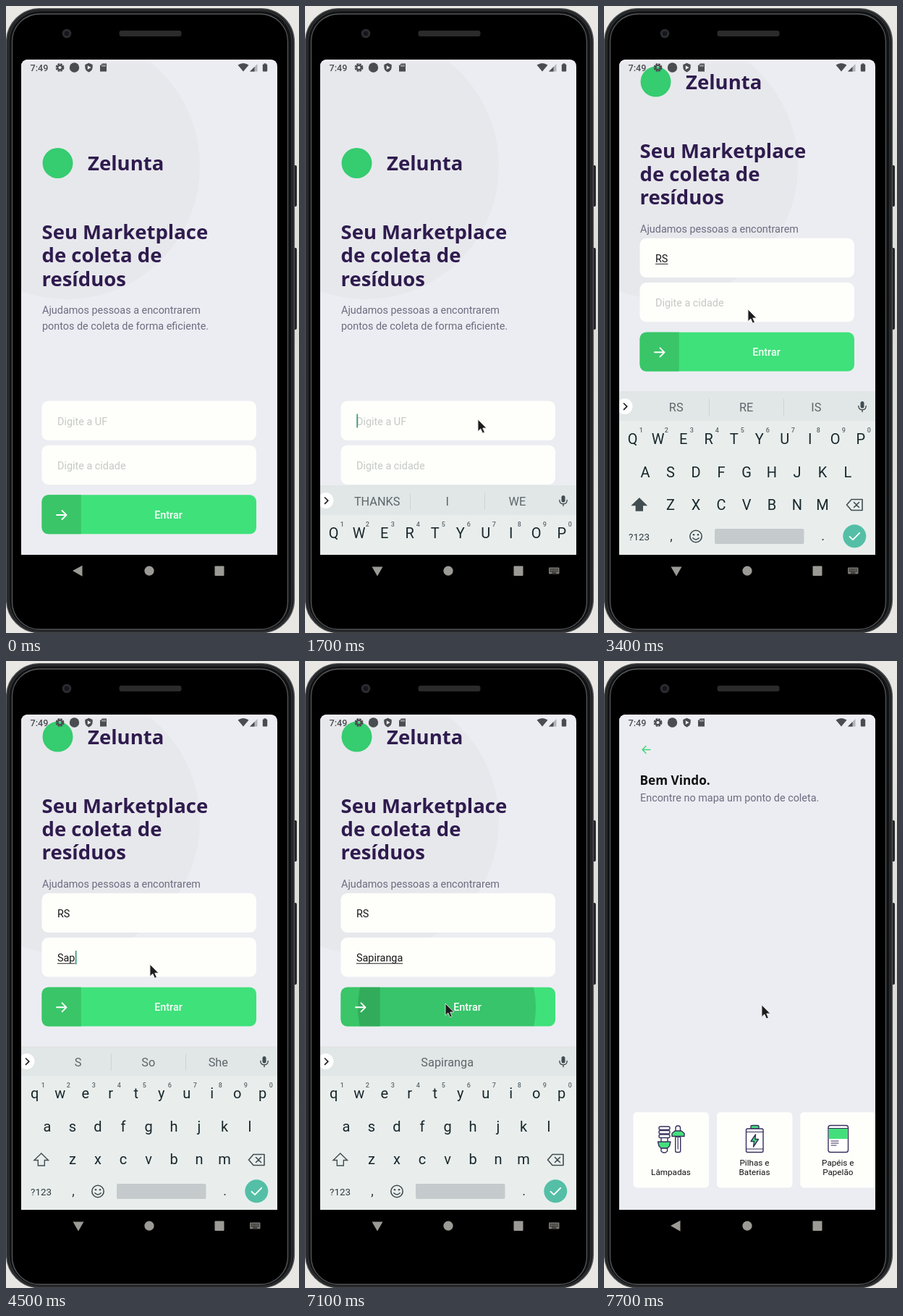
An HTML page that plays this animation: 405 by 866 pixels, repeating every 8000 ms.

```html
<!DOCTYPE html>
<html lang="pt">
<head>
<meta charset="utf-8">
<title>Coleta de resíduos</title>
<style>
  html, body { margin: 0; width: 100%; height: 100%; overflow: hidden; background: #e6e5e0; }
  svg { display: block; width: 100vw; height: 100vh; font-family: Roboto, sans-serif; }
  .head { font-family: "Noto Sans", sans-serif; font-weight: 700; }
  .mid { text-anchor: middle; }
  .line { fill: none; stroke-linecap: round; stroke-linejoin: round; }
  #suggestions { font-size: 16.3px; fill: #5d676b; }
  #letters { font-size: 20px; fill: #18272b; }
</style>
</head>
<body>
<svg id="stage" viewBox="0 0 405 866"></svg>
<script>
const LOOP = 8000, STEP = 100;

const text = (x, y, size, fill, value, extra = '') =>
  `<text x="${x}" y="${y}" font-size="${size}" fill="${fill}" ${extra}>${value}</text>`;
const box = (x, y, w, h, r, fill, extra = '') =>
  `<rect x="${x}" y="${y}" width="${w}" height="${h}" rx="${r}" fill="${fill}" ${extra}/>`;
const dot = (x, y, r, fill, extra = '') => `<circle cx="${x}" cy="${y}" r="${r}" fill="${fill}" ${extra}/>`;
const shape = (d, fill, extra = '') => `<path d="${d}" fill="${fill}" ${extra}/>`;
const line = (d, color, width, extra = '') =>
  `<path class="line" d="${d}" stroke="${color}" stroke-width="${width}" ${extra}/>`;

const device = `
  ${box(0, 0, 405, 866, 0, 'url(#backdrop)')}
  ${box(396, 220, 6, 57, 2, '#242527')}${box(396, 334, 6, 113, 2, '#242527')}
  ${box(.7, 3.7, 397.6, 862, 46, '#1d1e20', 'stroke="#4b4d50" stroke-width="1.6"')}
  ${box(4, 6.5, 391, 857, 43, '#111213', 'stroke="#2f3133" stroke-width="1.5"')}
  ${box(8.5, 11, 381, 850, 38, '#000', 'stroke="#55575a" stroke-width="1.3"')}
  ${dot(84, 38, 6.3, '#2b2c30')}${dot(84, 38, 3.2, '#15161c')}
  ${box(156.5, 34, 86, 8, 3, '#2b2b2b')}`;

const home = `
  ${box(21, 74, 354, 684, 0, '#ecedf2')}
  ${dot(84, 221, 184, '#e7e8ec')}
  <g id="intro">
    ${dot(71.5, 217, 21, '#36cc70')}
    <g class="head">
      ${text(113, 227, 27.5, '#2f1b4e', 'Zelunta')}
      ${['Seu Marketplace', 'de coleta de', 'resíduos']
        .map((s, i) => text(49.5, 322 + i * 32.4, 27.5, '#2f1b4e', s)).join('')}
    </g>
    ${text(50, 425, 14.4, '#6c6c80', 'Ajudamos pessoas a encontrarem')}
    ${text(50, 446.6, 14.4, '#6c6c80', 'pontos de coleta de forma eficiente.')}
  </g>
  <g id="form">
    ${box(49.5, 545.5, 296.5, 54.3, 9, '#fefffb')}
    ${box(49.5, 606.7, 296.5, 54.3, 9, '#fefffb')}
    <text id="state" x="71" y="578.5" font-size="14.4"></text>
    <text id="city" x="71" y="640" font-size="14.4"></text>
    <rect id="underline" x="71" height="1" fill="#222"/>
    <rect id="caret" width="1.8" height="19" fill="#3f9f86"/>
    <g clip-path="url(#button)">
      ${box(49, 675, 297, 55, 0, '#3fe17a')}${box(49, 675, 54.7, 55, 0, '#39c568')}
      ${dot(196, 703, 0, '#000', 'id="ripple" opacity=".13"')}
    </g>
    ${line('M70 703H83.5M77.5 697L83.5 703L77.5 709', '#fff', 1.9)}
    ${text(224.5, 708, 14.4, '#fff', 'Entrar', 'class="mid" font-weight="500"')}
  </g>`;

const INK = '#37305c', GREEN = '#44df7c';
const inked = `stroke="${INK}" stroke-width="1.4" stroke-linejoin="round"`;
const card = (x, icon, labels) => box(x, 623.3, 104.5, 104.2, 5, '#fefffb') + icon +
  labels.map((s, i) => text(x + 52, 710 - (labels.length - 1 - i) * 13.5, 11.7, '#111', s, 'class="mid"')).join('');

const lamps = [643, 648.5, 654].map(y => box(76, y, 15, 4.5, 2, '#fff', inked)).join('') +
  line('M79 659V664M88 659V664', INK, 1.4) +
  shape('M74.5 664H92L90.5 670L87.5 673H79L76 670Z', GREEN, inked) + shape('M79 673H87.5V677L85 679H81.5L79 677Z', '#fff', inked) +
  box(99, 642, 6.5, 9, 3, '#fff', inked) + box(98.7, 657, 7, 21.5, 2, '#fff', inked) + line('M102.2 658V674', INK, 1.2) +
  shape('M94 656.5V652.5L98 649H107L111 652.5V656.5Z', GREEN, inked);
const battery = shape('M203 646V643Q203 641.5 205 641.5H212Q214 641.5 214 643V646Z', GREEN, inked) +
  box(196.5, 646, 23.5, 32.5, 2, '#fff', inked) + line('M196.5 650.5H220M196.5 674H220', INK, 1.2) +
  shape('M209.5 654L203 663.5H207.5L206.5 671L213.5 660.5H209Z', GREEN, inked);
const paper = box(310, 641.5, 27.5, 37, 3, '#fff', inked) + box(310.7, 646, 26, 14, 0, GREEN) +
  line('M310 645.5H337M314 663H324M314 666H324M314 669H321', INK, 1.1);

const points = `
  ${box(21, 74, 354, 684, 0, '#ecedf2')}
  ${line('M64 122.5H53M58 117.5L53 122.5L58 127.5', '#3dd673', 1.4)}
  ${text(49.5, 170.5, 17.2, '#111', 'Bem Vindo.', 'class="head"')}
  ${text(50, 194, 14.4, '#6c6c80', 'Encontre no mapa um ponto de coleta.')}
  <g id="cards">
    ${card(40.5, lamps, ['Lâmpadas'])}
    ${card(156, battery, ['Pilhas e', 'Baterias'])}
    ${card(271.3, paper, ['Papéis e', 'Papelão'])}
  </g>`;

const GREY = '#4b4c50';
const statusBar = `
  ${box(21, 74, 354, 7, 0, 'url(#sheen)')}
  ${text(33.5, 89.5, 12.6, GREY, '7:49', 'font-weight="500"')}
  <circle cx="74.5" cy="85" r="4.7" fill="none" stroke="${GREY}" stroke-width="2.4" stroke-dasharray="2.7 1"/>
  <circle cx="74.5" cy="85" r="3.1" fill="none" stroke="${GREY}" stroke-width="2"/>
  ${dot(94.5, 85, 6.7, GREY)}
  ${shape('M114.5 78.8L119.7 81V85Q119.2 89.5 114.5 91.5Q109.8 89.5 109.3 85V81Z', GREY)}
  ${shape('M112.8 82.2L117.6 85L112.8 87.8Z', '#ecedf2')}
  ${shape('M133 79.5H139V90.5H130V82.5Z', GREY)}
  ${line('M133 81.5V83.5M135 81.5V83.5M137 81.5V83.5', '#ecedf2', .8)}
  ${shape('M320.5 81.5Q328 76.5 335.5 81.5L328 90.5Z', GREY)}
  ${shape('M337 90.5L347.5 80V90.5Z', '#b4b5b9')}${shape('M337 90.5L343.5 84V90.5Z', GREY)}
  ${box(354.8, 80.5, 6.4, 10, 1, GREY)}${box(356.5, 79.3, 3, 2, 0, GREY)}`;

const ROWS = [['qwertyuiop', 39.7, 605], ['asdfghjkl', 57, 651], ['zxcvbnm', 92, 696]];
const keyXs = ([keys, x0]) => [...keys].map((k, i) => x0 + i * 35);
const letters = upper => ROWS.map(row => keyXs(row).map((x, i) =>
  `<text class="mid" x="${x}" y="${row[2] - (upper ? 0 : 1.5)}">${upper ? row[0][i].toUpperCase() : row[0][i]}</text>`
).join('')).join('');

const DARK = '#414d51';
const keyboard = `
  ${box(21, 532, 354, 230, 0, '#e9eeed')}${box(21, 532, 354, 41, 0, '#e1e6e6')}
  ${dot(28.5, 553, 11, '#fff')}${line('M27.5 549L31.8 553.2L27.5 557.4', '#222', 1.7)}
  <g id="suggestions"></g>
  ${line('M145.5 543V565M248.5 543V565', '#cdd3d3', 1, 'id="dividers"')}
  ${box(354.5, 546, 5, 9.5, 2.5, DARK)}${line('M351.8 552.5Q352 557.8 357 557.8Q362 557.8 362.2 552.5M357 558V560.5', DARK, 1.4)}
  <g id="letters"></g>
  ${keyXs(ROWS[0]).map((x, i) => text(x + 11.5, 589.3, 9, '#5d676b', (i + 1) % 10, 'class="mid" font-weight="500"')).join('')}
  ${shape('M48.8 680L58.5 689.5H53.3V697H44.3V689.5H39Z', DARK, `id="shift" stroke="${DARK}" stroke-width="1.4"`)}
  ${line('M342 681.5H357V696.5H342L335.5 689ZM345.5 685.5L352.5 692.5M352.5 685.5L345.5 692.5', DARK, 1.6)}
  ${text(48.5, 737.5, 13.4, '#2c3a3e', '?123', 'class="mid"')}
  ${text(93, 738, 18, '#2c3a3e', ',', 'class="mid"')}${text(302.5, 738, 18, '#2c3a3e', '.', 'class="mid"')}
  <circle cx="127" cy="732.5" r="8.2" fill="none" stroke="${DARK}" stroke-width="1.6"/>
  ${dot(124, 730.2, 1.3, DARK)}${dot(130, 730.2, 1.3, DARK)}${line('M122.8 734.8Q127 739.3 131.2 734.8', DARK, 1.5)}
  ${box(153, 722, 123.5, 21, 2, '#c5cacd')}
  ${dot(346.3, 732.3, 16, '#54bfa6')}${line('M339.5 732.8L344 737.2L353.2 727.8', '#fff', 1.8)}`;

const NAV = '#9b9a95';
const navBar = `
  ${shape('M92 780L105.5 772.7V787.7Z', NAV, 'id="back"')}
  ${shape('M92.5 774.5H107.5L100 787.5Z', NAV, 'id="down"')}
  ${dot(198, 780.2, 6.6, NAV)}${box(288.5, 773.5, 13, 13.5, 1, NAV)}
  <g id="switcher">${box(337, 775.5, 14.5, 9, 1, '#77756f')}
    ${line('M339 778H350M339 780.6H350', '#000', 1, 'stroke-dasharray="1 1.3"')}${line('M341.5 783H347', '#000', 1)}</g>`;

const $ = id => document.getElementById(id);
$('stage').innerHTML = `
  <defs>
    <linearGradient id="backdrop" x2="0" y2="1">
      <stop stop-color="#e9e8e4"/><stop offset=".5" stop-color="#dddcd8"/><stop offset="1" stop-color="#e8e7e3"/>
    </linearGradient>
    <linearGradient id="sheen" x2="0" y2="1">
      <stop stop-color="#f8effa"/><stop offset="1" stop-color="#ecedf2" stop-opacity="0"/>
    </linearGradient>
    <clipPath id="screen"><path d="M21 758V84Q21 74 31 74H365Q375 74 375 84V758Z"/></clipPath>
    <clipPath id="button"><rect x="49.5" y="675.3" width="296.5" height="54" rx="9"/></clipPath>
  </defs>
  ${device}
  <g clip-path="url(#screen)">
    <g>${home}</g><g id="points">${points}</g>${statusBar}<g id="keyboard">${keyboard}</g>
  </g>
  ${navBar}
  ${shape('M0 0V16.5L3.8 13L6.5 19L9.3 17.8L6.7 12H11.8Z', '#1c1c1c', 'id="pointer" stroke="#e8e8e8" stroke-width=".9"')}`;

// time, state field, city field, capitals, suggestions
const IDLE = ['THANKS', 'I', 'WE'];
const typing = [
  [0, '', '', true, IDLE],
  [2500, 'R', '', false, IDLE],
  [2600, 'R', '', true, ['R', 'RE', 'RIGHT']],
  [2900, 'RS', '', true, ['RS', 'RE', 'IS']],
  [3800, 'RS', '', true, IDLE],
  [3900, 'RS', 'S', true, IDLE],
  [4000, 'RS', 'S', false, ['S', 'So', 'She']],
  [4200, 'RS', 'Sa', false, ['S', 'So', 'She']],
  [4500, 'RS', 'Sap', false, ['S', 'So', 'She']],
  [4600, 'RS', 'Sap', false, ['Sap', 'Sap\'s', 'Saps']],
  [4800, 'RS', 'Sapi', false, ['Sapi', 'Sapienza', 'Sapiens']],
  [5000, 'RS', 'Sapira', false, ['', 'Sapira', '']],
  [5100, 'RS', 'Sapiran', false, ['', 'Sapiran', '']],
  [5300, 'RS', 'Sapirang', false, ['', 'Sapirang', '']],
  [5400, 'RS', 'Sapiranga', false, ['', 'Sapiranga', '']]
];
const caretOn = [[1600, 2200], [2500, 3400], [3600, 6000], [6400, 6900]];

const tracks = {
  pointer: [[800, 369, 541], [900, 330, 562], [1000, 330, 562], [1200, 270, 569], [1400, 239, 571],
    [2900, 239, 571], [3000, 236, 582], [3400, 199, 419], [6100, 199, 419], [6200, 198, 450],
    [6300, 198, 450], [6400, 202, 466], [6700, 194, 473], [7100, 194, 473], [7700, 218, 475]],
  keyboard: [[1600, 226], [1700, 130], [1800, 40], [1900, 0], [7200, 0], [7500, 226]],
  lift: [[1700, 0], [1800, .6], [1900, 1]],
  ripple: [[7000, 0], [7100, 123], [7300, 220]],
  page: [[7200, 0, 50], [7300, .4, 30], [7400, .85, 10], [7500, 1, 0]]
};

function sample(track, t) {
  const next = track.findIndex(key => key[0] > t);
  if (next === 0) return track[0].slice(1);
  if (next < 0) return track[track.length - 1].slice(1);
  const [a, b] = [track[next - 1], track[next]];
  const k = (t - a[0]) / (b[0] - a[0]);
  return a.slice(1).map((v, i) => v + (b[i + 1] - v) * k);
}

const set = (id, attrs) => { for (const name in attrs) $(id).setAttribute(name, attrs[name]); };
const show = (id, on) => set(id, { visibility: on ? 'visible' : 'hidden' });
const move = (id, x, y) => set(id, { transform: `translate(${x} ${y})` });

function fillField(id, value, placeholder) {
  $(id).textContent = value || placeholder;
  set(id, { fill: value ? '#151515' : '#c6c8c5' });
  return value ? $(id).getComputedTextLength() : 0;
}

function render(t) {
  const [, state, city, capitals, words] = typing.filter(row => row[0] <= t).pop();
  const widths = [fillField('state', state, 'Digite a UF'), fillField('city', city, 'Digite a cidade')];
  const inCity = t >= 3600;
  const composing = t < 3800 ? 0 : 1;
  set('caret', { x: 71.3 + widths[+inCity], y: inCity ? 624.8 : 563.5 });
  show('caret', caretOn.some(([from, to]) => t >= from && t < to));
  set('underline', { y: composing ? 642 : 580.5, width: widths[composing] });

  $('suggestions').innerHTML = words.map((w, i) =>
    `<text class="mid" x="${[99.7, 196.7, 293.3][i]}" y="560">${w}</text>`).join('');
  show('dividers', words[0]);
  $('letters').innerHTML = letters(capitals);
  set('shift', { fill: capitals ? DARK : 'none' });

  const [lift] = sample(tracks.lift, t);
  move('intro', 0, -112.4 * lift);
  move('form', 0, -224.7 * lift);
  move('keyboard', 0, sample(tracks.keyboard, t)[0]);
  set('ripple', { r: sample(tracks.ripple, t)[0] });

  const [opacity, drop] = sample(tracks.page, t);
  set('points', { opacity });
  move('points', 0, drop);
  show('cards', t >= 7600);

  const open = t >= 1600 && t < 7300;
  show('back', !open);
  show('down', open);
  show('switcher', open);
  move('pointer', ...sample(tracks.pointer, t));
  show('pointer', t >= 800);
}

const start = performance.now();
let last = -1;
function tick() {
  const t = Math.floor((performance.now() - start) % LOOP / STEP) * STEP;
  if (t !== last) render(last = t);
  requestAnimationFrame(tick);
}
tick();
</script>
</body>
</html>
```
